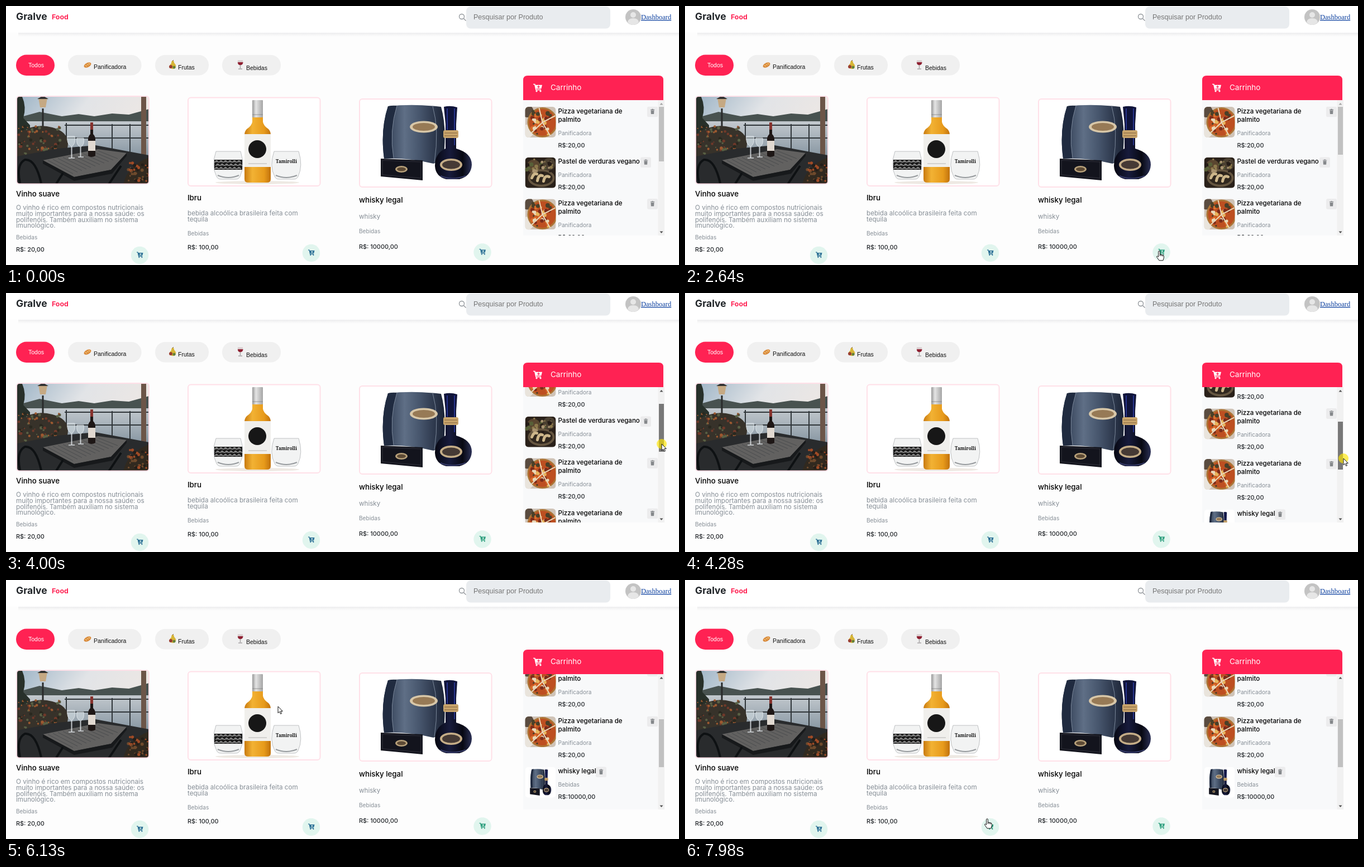
Animation, 1205 px wide and 465 px high, one loop 8000 ms. Source, as an HTML page:

```html
<!DOCTYPE html>
<html lang="pt-BR">
<head>
<meta charset="utf-8">
<title>Gralve Food</title>
<style>
html, body { margin: 0; width: 100%; height: 100%; overflow: hidden; background: #fdfdfd; }
#stage { display: block; width: 100vw; height: 100vh; font-family: Inter, 'Open Sans', sans-serif; fill: #212529; }
.brand { font-weight: 700; font-size: 17.5px; }
.brand-tag { font-weight: 700; font-size: 12.3px; fill: #ff2253; }
.ui { font-family: 'Liberation Sans', Arial, sans-serif; font-size: 10.5px; fill: #111; }
.hint { font-size: 12.5px; fill: #757575; }
.link { font-family: 'Liberation Serif', serif; font-size: 12.5px; fill: #0b3f9e; text-decoration: underline; }
.title { font-weight: 500; font-size: 13.3px; fill: #000; }
.desc { font-size: 11.65px; fill: #868e96; }
.cat { font-size: 10.1px; fill: #868e96; }
.price { font-weight: 500; font-size: 10.9px; }
.item { font-weight: 500; font-size: 11.55px; fill: #000; }
.frame { fill: none; stroke: #ffe0e8; stroke-width: 2; }
.add { color: #2b6f95; --hole: #e1f5ee; }
.add.used { color: #2a9d7c; }
.pointer { fill: #fff; stroke: #111; stroke-width: 1; stroke-linejoin: round; }
</style>
</head>
<body>
<svg id="stage" viewBox="0 0 1205 465" preserveAspectRatio="none">
  <defs>
    <linearGradient id="shade" x2="0" y2="1"><stop stop-color="#ededee"/><stop offset="1" stop-color="#fdfdfd"/></linearGradient>
    <linearGradient id="sky" x2="1" y2=".5"><stop stop-color="#9db4c6"/><stop offset=".45" stop-color="#e2e4e7"/><stop offset="1" stop-color="#f0e8e3"/></linearGradient>
    <linearGradient id="lake" x2="0" y2="1"><stop stop-color="#c3c9ce"/><stop offset="1" stop-color="#8897a3"/></linearGradient>
    <linearGradient id="amber"><stop stop-color="#c97a10"/><stop offset=".3" stop-color="#f2b234"/><stop offset=".75" stop-color="#e79a1b"/><stop offset="1" stop-color="#c1720d"/></linearGradient>
    <linearGradient id="silver"><stop stop-color="#999"/><stop offset=".35" stop-color="#e4e4e4"/><stop offset="1" stop-color="#a5a5a5"/></linearGradient>
    <linearGradient id="case"><stop stop-color="#28344a"/><stop offset=".35" stop-color="#5f6f86"/><stop offset=".6" stop-color="#46556c"/><stop offset="1" stop-color="#1c2436"/></linearGradient>
    <linearGradient id="flask"><stop stop-color="#070812"/><stop offset=".4" stop-color="#171b3c"/><stop offset=".75" stop-color="#080913"/><stop offset="1" stop-color="#2b3055"/></linearGradient>
    <clipPath id="round"><rect width="55" height="55" rx="6"/></clipPath>
    <clipPath id="photo"><rect x="20" y="162.500" width="235.500" height="156.500" rx="4"/></clipPath>

    <symbol id="cart" viewBox="0 0 16 15" overflow="visible">
      <path d="M0 1H2.800L5 11H14" fill="none" stroke="currentColor" stroke-width="1.700"/>
      <path d="M3.300 2.200H16L14.300 9H4.700Z" fill="currentColor"/>
      <circle cx="6" cy="13.300" r="1.600" fill="currentColor"/><circle cx="13" cy="13.300" r="1.600" fill="currentColor"/>
      <path d="M9.500 3.300V8M7.200 5.600H11.900" stroke="var(--hole)" stroke-width="1.400"/>
    </symbol>
    <symbol id="trash" viewBox="0 0 19 19">
      <rect width="19" height="19" rx="3" fill="#ececed"/>
      <path d="M6 5.200h2l.6-.9h2l.6.9h2v1.200H6ZM6.500 7h6l-.4 6.600H6.900Z" fill="#85888b"/>
    </symbol>

    <symbol id="whisky" viewBox="634 168 235 156">
      <rect x="634" y="168" width="235" height="156" fill="#fff"/>
      <path d="M684 180Q730 175 779 181Q790 220 783 276L765 283Q720 272 677 274Q670 222 684 180Z" fill="url(#case)"/>
      <path d="M684 180Q692 178 700 179Q686 224 694 273L677 274Q670 222 684 180Z" fill="#202b40"/>
      <path d="M700 179Q686 224 694 273M764 180Q776 222 767 281" fill="none" stroke="#7a8799"/>
      <ellipse cx="748" cy="217" rx="25" ry="10.500" fill="#d8c7a8"/><ellipse cx="748" cy="217" rx="20" ry="7" fill="#977a56"/>
      <path d="M671 274L746 277V313L671 306Z" fill="#13141d"/><path d="M674 277L743 280V309L674 303Z" fill="none" stroke="#3b3b46" stroke-width=".7"/>
      <ellipse cx="708" cy="293" rx="11" ry="6" fill="#b9a27b"/><ellipse cx="708" cy="293" rx="8" ry="3.500" fill="#5d4a35"/>
      <path d="M787 236H806V256Q834 264 834 285Q833 305 812 311H788Q769 306 768 287Q768 264 787 256Z" fill="url(#flask)"/>
      <path d="M784 181Q796 178 808 182L806 212H787Z" fill="#10143a"/><path d="M787 210H806V224H787Z" fill="#10143a"/><path d="M790 184V222M803 184V250" stroke="#2f3fa6" stroke-width="1.500"/>
      <rect x="783" y="223" width="27" height="14" rx="3" fill="#c9a56c"/><path d="M785 228H808M785 233H808" stroke="#80613c"/>
      <ellipse cx="797" cy="285" rx="20" ry="11" fill="#c5ad87"/><ellipse cx="797" cy="285" rx="16" ry="7.500" fill="#463a35"/>
      <path d="M778 305Q798 314 823 305" fill="none" stroke="#353a68" stroke-width="2"/>
    </symbol>
    <symbol id="pizza" viewBox="0 0 55 55">
      <rect width="55" height="55" fill="#cfc3b7"/><circle cx="3" cy="44" r="12" fill="#e9e4dc"/><circle cx="4" cy="8" r="11" fill="#5a4c40"/>
      <circle cx="31" cy="28" r="27" fill="#ad7435"/><circle cx="31" cy="28" r="24" fill="#bd4f21"/>
      <g id="toppings"/>
      <path d="M31 28L25 2M31 28L54 16M31 28L45 52M31 28L11 47" stroke="#ead9bb" stroke-width="2"/>
    </symbol>
    <symbol id="pastel" viewBox="0 0 55 55">
      <rect width="55" height="55" fill="#2a211a"/><circle cx="15" cy="16" r="12" fill="#5a4630"/><circle cx="43" cy="12" r="11" fill="#4b4031"/>
      <ellipse cx="29" cy="37" rx="24" ry="16" fill="#665640"/><ellipse cx="29" cy="37" rx="20" ry="12" fill="#30271e"/>
      <g id="fillings"/>
      <path d="M12 37q3-9 9-7M22 42q2-12 9-9M33 43q2-12 10-8" fill="none" stroke="#cdb68a" stroke-width="5" stroke-linecap="round"/>
    </symbol>
  </defs>

  <rect width="1205" height="465" fill="#fdfdfd"/>
  <rect width="1205" height="48" fill="#fff"/>
  <rect x="22" y="48" width="1183" height="7" fill="url(#shade)"/>
  <text class="brand" x="18" y="25">Gralve</text><text class="brand-tag" x="82" y="24">Food</text>
  <g fill="none" stroke="#8d9297" stroke-width="1.300"><circle cx="816" cy="19" r="4.500"/><path d="M819.500 22.500l4 4"/></g>
  <rect x="824" y="1" width="258" height="39.500" rx="8" fill="#e9ecef"/>
  <text class="ui hint" x="837" y="24">Pesquisar por Produto</text>
  <circle cx="1123" cy="20" r="14" fill="#c3c3c3"/>
  <circle cx="1123" cy="16" r="5" fill="#e6e6e6"/><path d="M1113 29q1-7 10-7t10 7q-4 5-10 5t-10-5Z" fill="#e6e6e6"/>
  <text class="link" x="1137" y="24">Dashboard</text>

  <rect x="18" y="87.500" width="69" height="37.500" rx="18.500" fill="#ff2253"/>
  <g fill="#f0f0f0"><rect x="111" y="88" width="131.500" height="36.500" rx="18"/><rect x="267" y="88" width="96" height="36.500" rx="18"/><rect x="387" y="88" width="105" height="36.500" rx="18"/></g>
  <g class="ui"><text x="40" y="110" fill="#fff">Todos</text><text x="157" y="113">Panificadora</text><text x="308" y="114">Frutas</text><text x="430" y="114.500">Bebidas</text></g>
  <g transform="rotate(-27 146 106)"><ellipse cx="146" cy="106" rx="7" ry="3.800" fill="#d8893b"/><path d="M142 104.500l2 3M145.500 104l2 3M149 104l1.500 3" stroke="#f6cf86" stroke-width="1.300"/></g>
  <path d="M298 98q3 0 3 4q4 4 3 7q-1 4-6 4q-5-1-5-5q0-3 3-5q0-4 2-5Z" fill="#d7b536"/><circle cx="295" cy="109" r="3" fill="#9a3e31"/><circle cx="301" cy="110" r="2.500" fill="#61803a"/><path d="M298 99l2-2" stroke="#6c4525"/>
  <path d="M415 97.500h9l.5 5q-1 4-5 4t-5-4Z" fill="#d8cccd"/><path d="M415 101h9.500q-.5 5-5 5t-4.500-5Z" fill="#8f1f31"/><path d="M419.500 106v6M416 113h7" stroke="#a7a3a5" stroke-width="1.500"/>

  <g clip-path="url(#photo)">
    <rect x="20" y="162" width="236" height="158" fill="url(#sky)"/>
    <path d="M20 201L60 190L100 198L130 194L158 198L190 193L220 195L256 185V209H20Z" fill="#485250"/>
    <rect x="20" y="207" width="236" height="62" fill="url(#lake)"/>
    <path d="M20 163H29Q37 181 31 201L43 214V245H20Z" fill="#27302a"/>
    <path d="M66 184V222" stroke="#292b2b" stroke-width="3"/><path d="M58 165h16l-3 17H61Z" fill="#c5a983"/><path d="M56 167l10-6 10 6" fill="#333"/>
    <path d="M105 214H256M105 237H256M108 210V270M190 212V270M222 212V270" stroke="#30363a" stroke-width="2"/>
    <path d="M20 230Q50 209 83 218T110 255L102 285H20Z" fill="#37322a"/><g id="flowers"/>
    <path d="M242 163H251V270H242Z" fill="#6c5548"/>
    <path d="M20 270L92 256L160 250L256 268V320H20Z" fill="#292b2d"/>
    <path d="M66 277L165 257L216 264L188 294L122 307Z" fill="#626160"/>
    <path d="M66 277L122 307L188 294L216 264V269L190 301L122 314L66 283Z" fill="#17191b"/>
    <g id="mesh" stroke="#454749" stroke-width=".8"/>
    <path d="M25 318Q18 284 34 276Q53 274 63 318M90 319L102 300M184 320L206 287" fill="none" stroke="#0e1113" stroke-width="4"/>
    <path d="M210 320Q218 286 256 272V320Z" fill="#31291f"/><g id="leaves"/>
    <path d="M151 210h5v20q4 4 4 9v30q-7 4-13 0v-30q0-5 4-9Z" fill="#1e1716"/><path d="M151 209h5v13h-5Z" fill="#87322d"/><rect x="147" y="242" width="13" height="18" fill="#e1d9d1"/>
    <g fill="#dce5ea" fill-opacity=".5" stroke="#e8edf0" stroke-width=".8"><path d="M110 234h13q2 14-5 18v21h5h-11h5v-21q-9-5-7-18ZM127 237h12q2 12-5 16v18h5h-10h4v-18q-8-4-6-16Z"/></g>
  </g>
  <rect class="frame" x="19" y="162" width="237" height="157.500" rx="5"/>

  <rect class="frame" x="326" y="164.500" width="236.500" height="158.500" rx="5" style="fill:#fff"/>
  <ellipse cx="450" cy="317" rx="75" ry="3" fill="#eee9e3"/>
  <path d="M441 194H460V208Q461 215 470 221Q474 225 474 232V311Q474 317 467 317H434Q427 317 427 311V232Q427 225 431 221Q440 215 441 208Z" fill="url(#amber)"/>
  <rect x="441" y="169" width="19" height="31" rx="1" fill="url(#silver)"/><path d="M441 195h19" stroke="#777" stroke-width=".7"/>
  <rect x="427" y="230" width="47" height="59" fill="#f0efec"/><circle cx="450" cy="257" r="16" fill="#171717"/>
  <path d="M434 283h33" stroke="#999" stroke-width=".7"/>
  <g fill="#f2f3f3" stroke="#b0b3b5" stroke-width=".8"><path id="tumbler" d="M376 261H420Q428 287 419 306Q417 311 411 311H385Q379 311 377 306Q367 287 376 261Z"/><use href="#tumbler" x="104"/></g>
  <path d="M373 276H423V294H373Z" fill="#171717"/><g id="scales" fill="none" stroke="#eee" stroke-width=".8"/>
  <path d="M379 304Q398 312 417 304M483 304Q502 312 521 304" fill="none" stroke="#969a9d" stroke-width="2"/>
  <text x="502" y="282" text-anchor="middle" style="font:700 8px 'Noto Serif',serif;fill:#111">Tamirolli</text>

  <use href="#whisky" x="634" y="168" width="235" height="156"/>
  <rect class="frame" x="633" y="167" width="236.500" height="158" rx="5"/>
  <g id="cards"/>

  <path d="M926 169V133q0-8 8-8H1169q8 0 8 8V169Z" fill="#ff2253"/>
  <use href="#cart" x="944" y="139.500" width="16" height="15" style="color:#fff;--hole:#ff2253"/>
  <text x="975" y="151" font-size="13.500" fill="#fff">Carrinho</text>
  <svg x="926" y="169" width="253" height="243" viewBox="926 169 253 243">
    <rect x="926" y="169" width="253" height="243" fill="#f8f9fa"/>
    <g id="list"/>
    <rect x="1167.500" y="169" width="11.500" height="243" fill="#f1f1f1"/>
    <path id="up" d="M1170.500 177.500h6l-3-3.500Z"/><path d="M1170.500 404.500h6l-3 3.500Z" fill="#505050"/>
    <rect id="thumb" x="1169" width="9" fill="#c1c1c1"/>
  </svg>

  <g id="cursor">
    <circle id="glow" r="9" fill="#ffe600" fill-opacity=".65"/>
    <path id="arrow" class="pointer" d="M0 0V11.800L2.700 9.300L4.600 13.500L6.500 12.700L4.700 8.600H8.300Z"/>
    <g id="hand" class="pointer"><path d="M-1.400 1.200a1.400 1.400 0 0 1 2.800 0V6l5 1q2 .5 2 2.300v2.600l-1.500 5H0L-4.600 10.200q.6-1.800 2-.8L-1.400 10.500Z"/><path d="M1.400 6V9M4 6.600V9.200M6.400 7.200V9.600" fill="none"/></g>
  </g>
</svg>
<script>
(() => {
  const $ = id => document.getElementById(id);
  const text = (cls, x, y, s) => `<text class="${cls}" x="${x}" y="${y}">${s}</text>`;
  const repeat = (n, make) => Array.from({ length: n }, (_, i) => make(i)).join('');

  function random(seed) {
    return () => (seed = (seed * 16807) % 2147483647) / 2147483647;
  }

  function scatter(id, count, [x, y, w, h], size, colors) {
    const rnd = random(count * 9700 + x + 1);
    $(id).innerHTML = repeat(count, i =>
      `<circle cx="${x + rnd() * w}" cy="${y + rnd() * h}" r="${size * (.5 + rnd())}" fill="${colors[i % colors.length]}"/>`);
  }

  scatter('flowers', 75, [22, 216, 78, 52], 2, ['#9c5930', '#29281f', '#70392a', '#596044']);
  scatter('leaves', 45, [219, 281, 37, 38], 2, ['#a04b26', '#241e19', '#6e4a2d']);
  scatter('toppings', 42, [12, 7, 39, 43], 2.6, ['#e8b45c', '#7b2c1a', '#e9d8b8', '#da6a28', '#494029']);
  scatter('fillings', 30, [3, 3, 48, 28], 2.5, ['#8d7a4c', '#251c17', '#586038', '#a99370']);

  $('mesh').innerHTML = repeat(11, i => `<path d="M${75 + i * 9} ${277 - i * 1.7}l${45 - i} ${24 - i}"/>`);
  $('scales').innerHTML = [281, 287, 293].map((y, row) => repeat(6, i =>
    `<path d="M${373 + i * 8 + row % 2 * 2} ${y}q4-7 8 0m-6 0q2-4 4 0"/>`)).join('');

  const products = [
    { x: 18, name: 'Vinho suave', y: 342, dy: 366, cy: 419, py: 441, price: '20,00', btn: [239.5, 447.5],
      lines: ['O vinho é rico em compostos nutricionais', 'muito importantes para a nossa saúde: os', 'polifenóis. Também auxiliam no sistema', 'imunológico.'] },
    { x: 325, name: 'Ibru', y: 349, dy: 376, cy: 412, py: 437, price: '100,00', btn: [546.5, 443.5],
      lines: ['bebida alcoólica brasileira feita com', 'tequila'] },
    { x: 632, name: 'whisky legal', y: 353, dy: 382, cy: 408, py: 436, price: '10000,00', btn: [853, 442],
      lines: ['whisky'] }
  ];
  $('cards').innerHTML = products.map(({ x, name, y, dy, cy, py, price, btn: [bx, by], lines }, i) =>
    text('title', x, y, name) +
    lines.map((s, n) => text('desc', x, dy + n * 10.8, s)).join('') +
    text('cat', x, cy, 'Bebidas') + text('price', x, py, 'R$: ' + price) +
    `<g class="add" id="add${i}"><circle cx="${bx}" cy="${by}" r="15.7" fill="#e1f5ee"/>
     <use href="#cart" x="${bx - 5.5}" y="${by - 6}" width="11.5" height="10.8"/></g>`).join('');

  const pizza = { img: 'pizza', lines: ['Pizza vegetariana de', 'palmito'], cat: 'Panificadora', price: '20,00', bin: 1148 };
  const pastel = { img: 'pastel', lines: ['Pastel de verduras vegano'], cat: 'Panificadora', price: '20,00', bin: 1136 };
  const whisky = { img: 'whisky', lines: ['whisky legal'], cat: 'Bebidas', price: '10000,00', bin: 1056 };
  let nextY = 181;
  $('list').innerHTML = [pizza, pastel, pizza, pizza, whisky].map(({ img, lines, cat, price, bin }) => {
    const y = nextY, extra = (lines.length - 1) * 16;
    nextY += 74.7 + extra;
    const size = img === 'whisky'
      ? 'width="235" height="156" transform="scale(.234 .3526)"'
      : 'width="55" height="55"';
    return `<g transform="translate(929.5 ${y})"><g clip-path="url(#round)"><use href="#${img}" ${size}/></g></g>` +
      lines.map((s, n) => text('item', 988.5, y + 11.5 + n * 15.5, s)).join('') +
      text('cat', 988.5, y + 35 + extra, cat) + text('price', 988.5, y + 57 + extra, 'R$:' + price) +
      `<use href="#trash" x="${bin}" y="${y - .5}" width="19" height="19"/>`;
  }).join('');

  // Bursts of screen updates: start, end, number of updates.
  const bursts = [[70, 830, 12], [900, 1110, 4], [1650, 1910, 3], [2640, 3380, 12], [3510, 3650, 3],
    [3860, 4560, 11], [5090, 5850, 11], [5920, 6690, 12], [6760, 7520, 12], [7590, 7980, 4]];
  // Pointer tip: time, x, y.
  const route = [[70, 1041, 451], [300, 962, 436], [560, 880, 422], [830, 853, 432], [1110, 849, 440],
    [2640, 849, 440], [2780, 819, 422], [3000, 940, 335], [3240, 1120, 262], [3380, 1165, 243],
    [3510, 1171, 249], [3650, 1173, 251], [3860, 1173, 258], [4000, 1174, 271], [4280, 1179, 297],
    [4560, 1184, 316], [5090, 1180, 314], [5420, 960, 290], [5850, 753, 262], [5990, 640, 240],
    [6130, 487, 227], [6340, 454, 290], [6690, 483, 402], [7100, 530, 447], [7300, 553, 450],
    [7520, 551, 441], [7980, 541, 429]];
  const drag = [[3650, 0], [3860, 6], [4000, 18], [4280, 50], [4560, 69]];

  function settle(t) {
    let q = 0;
    for (const [from, to, n] of bursts) {
      const step = (to - from) / (n - 1);
      if (t >= from) q = Math.min(to, from + Math.floor((t - from) / step + 1e-6) * step);
    }
    return q;
  }

  function sample(keys, t) {
    const i = keys.findIndex(k => k[0] >= t);
    if (i < 0) return keys[keys.length - 1].slice(1);
    if (i === 0) return keys[0].slice(1);
    const a = keys[i - 1], b = keys[i], p = (t - a[0]) / (b[0] - a[0]);
    return a.slice(1).map((v, n) => v + (b[n + 1] - v) * p);
  }

  const show = (id, on) => { $(id).style.display = on ? '' : 'none'; };

  function draw(t) {
    const q = settle(t);
    const [x, y] = sample(route, q).map(Math.round);
    const overButton = products.some(({ btn }) => Math.hypot(x - btn[0], y - btn[1]) < 16);
    const pressed = q >= 3650 && q < 5090;
    show('cursor', q >= 70);
    $('cursor').setAttribute('transform', `translate(${x} ${y})`);
    show('hand', overButton);
    show('arrow', !overButton);
    show('glow', pressed || (q >= 1650 && q < 1910));

    const moved = Math.round(sample(drag, q)[0]);
    $('list').setAttribute('transform', `translate(0 ${-Math.round(moved * 2.78)})`);
    $('thumb').setAttribute('y', 181 + moved);
    $('thumb').setAttribute('height', q < 1780 ? 98 : 86);
    $('thumb').setAttribute('fill', pressed ? '#787878' : q >= 3510 && q < 3650 ? '#a8a8a8' : '#c1c1c1');
    $('up').setAttribute('fill', moved ? '#505050' : '#a3a3a3');
    $('add2').classList.toggle('used', q >= 900);
    $('add1').classList.toggle('used', q >= 7520);
  }

  const begin = performance.now();
  function tick() {
    draw((performance.now() - begin) % 8000);
    requestAnimationFrame(tick);
  }
  tick();
})();
</script>
</body>
</html>
```
